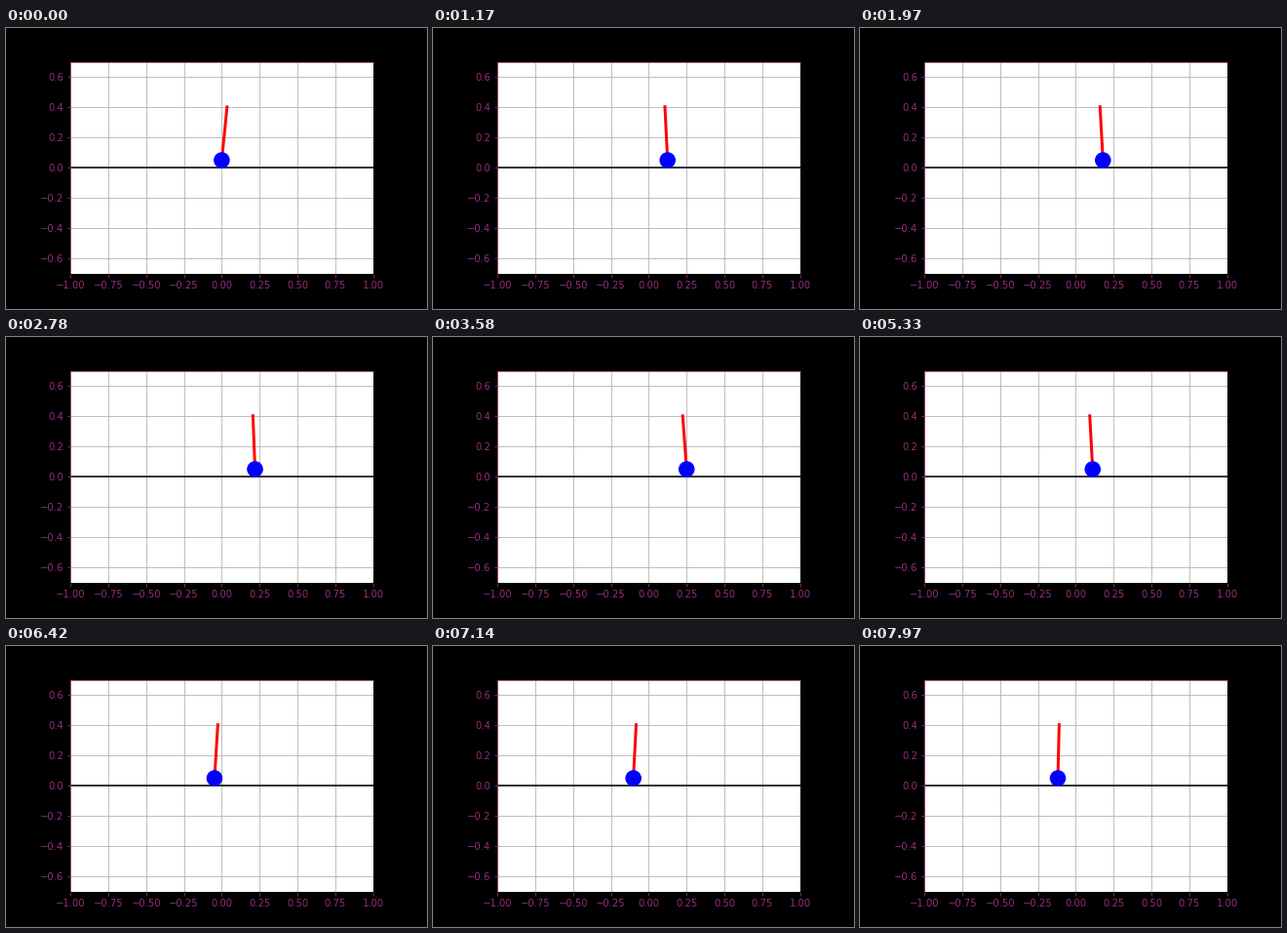
Recreate the animation shown at these times as a matplotlib script. Size 432x288 px, loop 8 s.

```python
import numpy as np
import matplotlib.pyplot as plt
from matplotlib.animation import FuncAnimation
from matplotlib.patches import Circle

FRAMES, INTERVAL = 320, 25
RADIUS, LENGTH = 0.05, 0.353
LABEL, EDGE = "#962d7d", "#96305f"

# Key poses: time (s), ball position, sideways lean of the rod
POSES = np.array([
    (0.00, 0.000, 0.035),
    (1.17, 0.126, -0.018),
    (2.78, 0.220, -0.014),
    (3.50, 0.250, -0.025),
    (4.33, 0.220, -0.033),
    (5.33, 0.111, -0.019),
    (6.42, -0.050, 0.022),
    (7.30, -0.109, 0.016),
    (8.00, -0.119, 0.008),
])
TIMES, STATES = POSES[:, 0], POSES[:, 1:]
SPEEDS = np.gradient(STATES, TIMES, axis=0)


def pose(t):
    """Ball position and lean at time t, eased between the key poses."""
    i = np.searchsorted(TIMES, t, side="right") - 1
    h = TIMES[i + 1] - TIMES[i]
    u = (t - TIMES[i]) / h
    ease = u * u * (3 - 2 * u)
    bend = u * (1 - u) * h * ((1 - u) * SPEEDS[i] - u * SPEEDS[i + 1])
    return (1 - ease) * STATES[i] + ease * STATES[i + 1] + bend


fig = plt.figure(figsize=(6, 4), dpi=72, facecolor="black")
fig.subplots_adjust(left=0.125, right=0.9, bottom=0.125, top=0.88)
ax = fig.add_subplot(aspect="equal", xlim=(-1, 1), ylim=(-0.7, 0.7))
ax.set_xticks(np.linspace(-1, 1, 9))
ax.set_yticks(np.linspace(-0.6, 0.6, 7))
ax.xaxis.set_major_formatter("{x:.2f}")
ax.yaxis.set_major_formatter("{x:.1f}")
ax.tick_params(color=EDGE, labelcolor=LABEL, labelsize=10,
               labelfontfamily="DejaVu Sans")
ax.grid(color="#b0b0b0", linewidth=0.8)
ax.spines[["left", "top"]].set_color(EDGE)

ax.plot([-1, 1], [0, 0], color="black", linewidth=1.5)
rod, = ax.plot([], [], color="red", linewidth=3)
ball = ax.add_patch(Circle((0, RADIUS), RADIUS, color="blue", linewidth=1,
                           zorder=3))


def update(i):
    x, lean = pose(i * INTERVAL / 1000)
    rod.set_data([x, x + lean],
                 [RADIUS, RADIUS + np.sqrt(LENGTH ** 2 - lean ** 2)])
    ball.center = (x, RADIUS)
    return rod, ball


anim = FuncAnimation(fig, update, frames=FRAMES, interval=INTERVAL,
                     init_func=lambda: update(0), repeat=True, repeat_delay=0)
plt.show()
```
